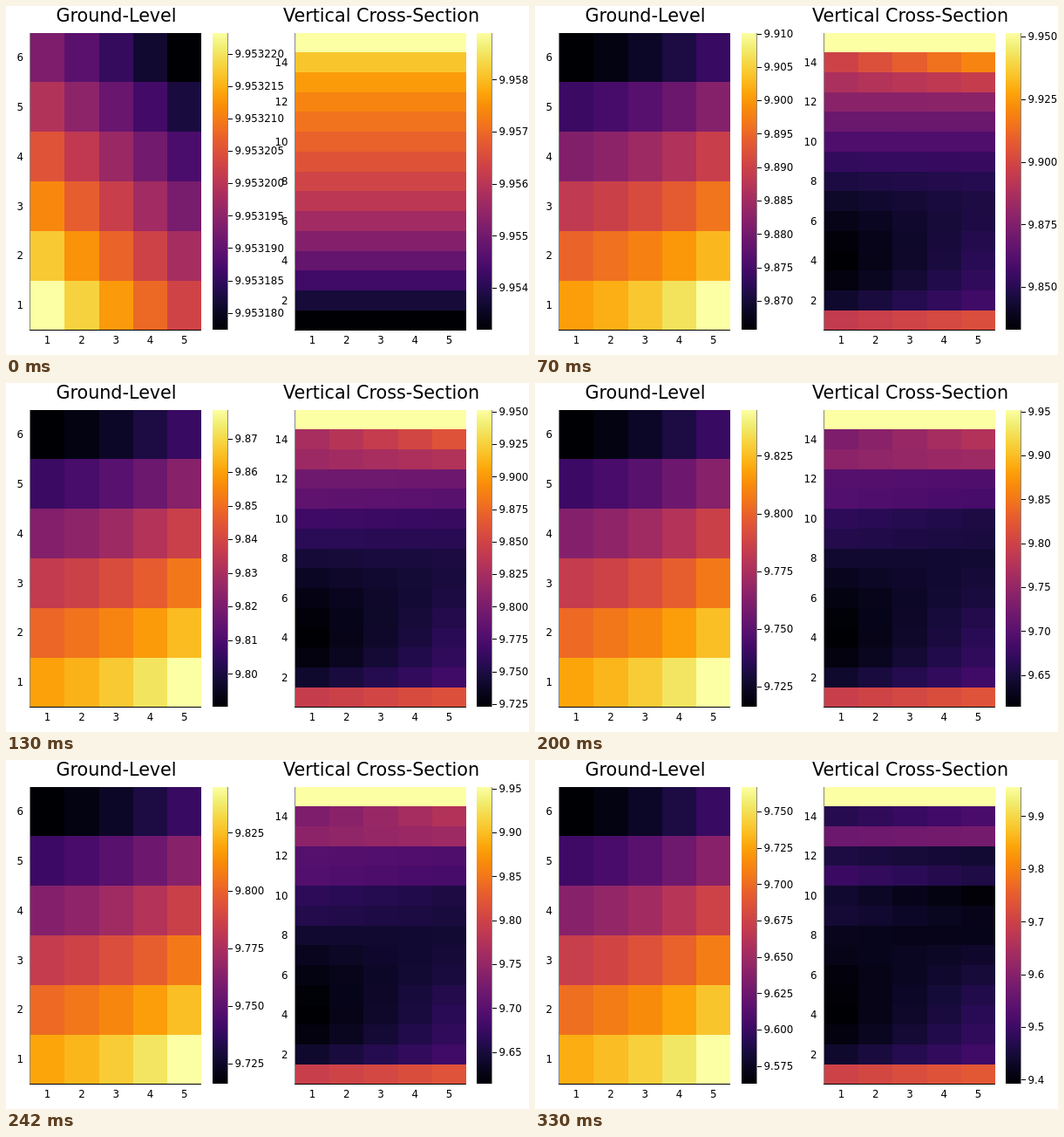
An HTML page for the animation above (0.39 s loop, 600 px wide and 400 px high).

```html
<!DOCTYPE html>
<html lang="en">
<head>
<meta charset="utf-8">
<title>Heatmaps</title>
<style>
html, body { margin: 0; width: 100%; height: 100%; overflow: hidden; background: #fff; }
svg { display: block; width: 600px; height: 400px; }
text { font-family: "DejaVu Sans", sans-serif; font-size: 11.8px; fill: #000; }
.title { font-size: 20.7px; }
rect, line { shape-rendering: crispEdges; }
line { stroke: #000; stroke-width: 1; }
.faint { stroke: #888; }
</style>
</head>
<body>
<svg id="stage" viewBox="0 0 600 400"></svg>
<script>
const TOP = 30.5, BOTTOM = 371.5, COLS = 5;
const stage = document.getElementById('stage');

// Inferno colour map, evenly spaced stops
const palette = ('000004 08051d 160b39 2a0b56 420a68 57106e 6a176e 7f1e6c 932667 a82e5f bc3754 ' +
  'cd4247 dd513a e9612b f37819 f98c0a fca50a fac026 f6d746 f1ed71 fcffa4').split(' ');
const rgb = palette.map(h => [0, 2, 4].map(i => parseInt(h.slice(i, i + 2), 16)));

const mix = (a, b, t) => a + (b - a) * t;
const bump = (x, centre, width) => Math.exp(-(((x - centre) / width) ** 2));

function inferno(v) {
  const p = Math.min(1, Math.max(0, v)) * (rgb.length - 1);
  const i = Math.min(rgb.length - 2, Math.floor(p));
  return `rgb(${rgb[i].map((c, k) => Math.round(mix(c, rgb[i + 1][k], p - i)))})`;
}

function add(parent, tag, attrs, label) {
  const el = document.createElementNS('http://www.w3.org/2000/svg', tag);
  for (const k in attrs) el.setAttribute(k, attrs[k]);
  if (label !== undefined) el.textContent = label;
  parent.appendChild(el);
  return el;
}

const write = (parent, x, y, label, anchor, cls = '') =>
  add(parent, 'text', { x, y, 'text-anchor': anchor, class: cls }, label);

const rule = (parent, x1, y1, x2, y2, cls = '') =>
  add(parent, 'line', { x1, y1, x2, y2, class: cls });

const ramp = add(add(stage, 'defs', {}), 'linearGradient', { id: 'ramp', x1: 0, y1: 1, x2: 0, y2: 0 });
palette.forEach((c, i) => add(ramp, 'stop', { offset: i / (palette.length - 1), 'stop-color': '#' + c }));

function makePlot({ title, titleX, left, right, rows, labelX, every, barX, field }) {
  const w = (right - left) / COLS, h = (BOTTOM - TOP) / rows;
  const axisX = Math.round(left) - 0.5;
  const cells = [];
  write(stage, titleX, 18, title, 'middle', 'title');
  for (let r = 0; r < rows; r++) {
    const y0 = Math.round(BOTTOM - (r + 1) * h), y1 = Math.round(BOTTOM - r * h);
    for (let c = 0; c < COLS; c++) {
      const x0 = Math.round(left + c * w), x1 = Math.round(left + (c + 1) * w);
      cells.push(add(stage, 'rect', { x: x0, y: y0, width: x1 - x0, height: y1 - y0 }));
    }
    if ((r + 1) % every === 0) write(stage, labelX, BOTTOM - (r + 0.5) * h + 4.2, r + 1, 'end');
  }
  for (let c = 0; c < COLS; c++) write(stage, left + (c + 0.5) * w, 387.2, c + 1, 'middle');
  rule(stage, axisX, 31, axisX, 371, 'faint');
  rule(stage, axisX - 0.5, 371.5, Math.round(right), 371.5);
  add(stage, 'rect', { x: barX, y: 31, width: 17, height: 340, fill: 'url(#ramp)' });
  rule(stage, barX + 17.5, 31, barX + 17.5, 371, 'faint');
  return { cells, barX, field, ticks: add(stage, 'g', {}) };
}

// Fields return 0..1; row counts up from the bottom, t runs 0..1 across,
// u runs 0..1 over the later scenes and is negative in the opening one.

function groundField(row, t, u) {
  const s = row / 5;
  if (u < 0) return 1 - 0.655 * s - t * (0.445 - 0.1 * s);
  const corner = mix(0.785, 0.815, u);
  const slope = row ? 0.18 : 1 - corner;
  return corner * (1 - 0.78 * s - 0.22 * s * s) + slope * t * (1 + t) / 2;
}

function sectionField(row, t, u) {
  if (u < 0) {
    const z = row / 14;
    return 0.74 * (1 - (1 - z) ** 2) + 0.26 * z ** 10;
  }
  if (row === 0) return 0.52 + 0.03 * u + 0.07 * t;
  if (row === 14) return 1;
  const s = Math.max(0, (row - 3) / 10);
  const ripple = 0.12 * u * s ** 3 * (-1) ** row;
  const west = row < 3 ? 0.02 * (row - 3) ** 2 : mix(0.55, 0.26, u) * s ** 1.7 + ripple;
  const tilt = 0.15 * bump(row, 2.6, 3.2) - 0.08 * u * bump(row, 9, 2) +
    mix(0.18, 0.08, u) * bump(row, 13, 1);
  return west + tilt * t;
}

const ground = makePlot({ title: 'Ground-Level', titleX: 126.5, left: 27.95, right: 224.45,
  rows: 6, labelX: 20, every: 1, barX: 237, field: groundField });
const section = makePlot({ title: 'Vertical Cross-Section', titleX: 430.5, left: 332, right: 528,
  rows: 15, labelX: 323.5, every: 2, barX: 540, field: sectionField });

// End time and the lowest and highest value of each plot
const scenes = [
  { end: 70, ground: [9.9531774, 9.9532233], section: [9.953193, 9.958914] },
  { end: 130, ground: [9.8657, 9.9102], section: [9.833, 9.9517] },
  { end: 200, ground: [9.7902, 9.8787], section: [9.7229, 9.952] },
  { end: 270, ground: [9.7163, 9.8452], section: [9.6141, 9.9527] },
  { end: 330, ground: [9.6396, 9.8074], section: [9.5061, 9.9541] },
  { end: 390, ground: [9.5629, 9.7674], section: [9.3925, 9.9571] }
];
const LOOP = scenes[scenes.length - 1].end;

// Smallest round step that leaves at most nine or so intervals
function tickStep(span) {
  for (let digits = 6; ; digits--) {
    for (const m of [1, 2.5, 5]) {
      const size = m * 10 ** -digits;
      if (span / size < 9.3) return { size, digits: digits + (m === 2.5 ? 1 : 0) };
    }
  }
}

function paint(plot, [low, high], u) {
  plot.cells.forEach((cell, i) => {
    const v = plot.field(Math.floor(i / COLS), i % COLS / (COLS - 1), u);
    cell.setAttribute('fill', inferno(v));
  });
  plot.ticks.replaceChildren();
  const { size, digits } = tickStep(high - low);
  for (let n = Math.ceil(low / size); n * size <= high; n++) {
    const y = mix(BOTTOM, TOP, (n * size - low) / (high - low));
    const lineY = Math.floor(y) + 0.5;
    rule(plot.ticks, plot.barX + 18, lineY, plot.barX + 23, lineY);
    write(plot.ticks, plot.barX + 25.6, y + 3.8, (n * size).toFixed(digits), 'start');
  }
}

let shown = -1;

function draw(time) {
  const step = scenes.findIndex(s => time % LOOP < s.end);
  if (step === shown) return;
  shown = step;
  const u = (step - 1) / (scenes.length - 2);
  paint(ground, scenes[step].ground, u);
  paint(section, scenes[step].section, u);
}

const start = performance.now();
function tick() {
  draw(performance.now() - start);
  requestAnimationFrame(tick);
}
tick();
</script>
</body>
</html>
```
